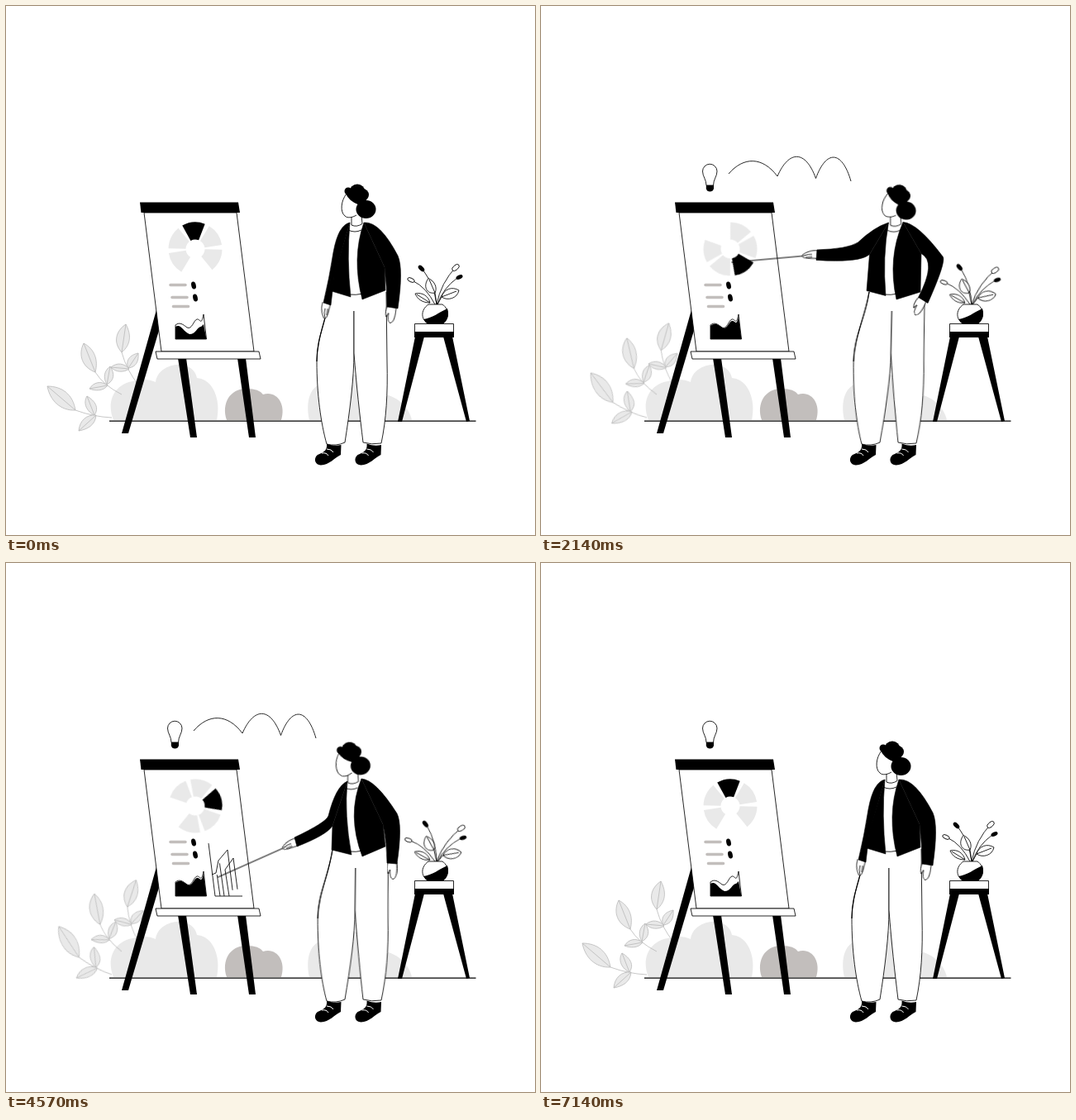
Recreate the animation shown at these times as an HTML page without scripts. Size 640 px wide and 640 px high, loop 7.21 s.

```html
<!DOCTYPE html>
<html lang="en">
<head>
<meta charset="utf-8">
<title>Presentation</title>
<style>
html, body { margin: 0; width: 100%; height: 100%; overflow: hidden; background: #fff; }
svg { display: block; width: 100%; height: 100%; }
svg * { animation: 7210ms ease-in-out infinite; }
.line { fill: none; stroke: #000; stroke-width: .85; }
.out { fill: #fff; stroke: #000; stroke-width: .85; stroke-linejoin: round; }
.pale { fill: #e9e9e9; }
.mid { fill: #c2bebc; }
.trim { stroke-dasharray: 1 2; animation-timing-function: linear; }

/* plants: --a is the swing of each part */
.sway { animation: sway 3605ms cubic-bezier(.37,0,.63,1) infinite alternate; }
@keyframes sway { to { transform: rotate(var(--a)); } }
.leaves path { fill: #e9e9e9; stroke: #b9b9b9; stroke-width: .8; }
.leaves .stem { fill: none; }
.pot .sway { transform-origin: 520px 361px; }

/* board */
#donut { transform-origin: 229px 294px; animation-name: spin; fill: none; stroke-width: 21; }
@keyframes spin {
  0% { transform: rotate(0); animation-timing-function: cubic-bezier(.33,0,.67,0); }
  20.8% { transform: rotate(54deg); animation-timing-function: cubic-bezier(.33,.23,.67,.67); }
  38.7% { transform: rotate(261deg); animation-timing-function: cubic-bezier(.33,.46,.67,.78); }
  53.5% { transform: rotate(385deg); animation-timing-function: cubic-bezier(.33,.33,.67,.46); }
  63.4% { transform: rotate(438deg); animation-timing-function: cubic-bezier(.33,.22,.67,.72); }
  79.2% { transform: rotate(642deg); animation-timing-function: cubic-bezier(.33,.92,.67,1); }
  99%, 100% { transform: rotate(720deg); }
}
#area { animation-name: area; }
@keyframes area {
  0%, 38.7%, 99%, 100% { d: path("M205 388C212 384 214 394 222 397C230 397 232 387 236 388L239 385 242.500 403H205Z"); }
  20.8%, 63.4% { d: path("M205 387C210 383 214 385 219 389C225 393 227 382 231 381C235 380 236 389 239 376L242.500 403H205Z"); }
  53.5%, 79.2% { d: path("M205 388C211 385 214 391 221 394C228 394 230 384 233 385C235 386 237 387 239 381L242.500 403H205Z"); }
}
#bars path { animation-name: bars; }
@keyframes bars {
  0%, 51.3% { stroke-dashoffset: 1.01; }
  64.4%, 85.3% { stroke-dashoffset: 0; }
  95.7%, 100% { stroke-dashoffset: 1.01; }
}

/* idea */
#arc { animation-name: arc; }
@keyframes arc {
  0% { stroke-dashoffset: 1.01; }
  11%, 87.500% { stroke-dashoffset: 0; }
  99%, 100% { stroke-dashoffset: -1.01; }
}
#bulb { animation-name: bulb; }
@keyframes bulb { 0%, 6.500% { opacity: 0; } 10%, 100% { opacity: 1; } }
#rays path { animation-name: rays; }
@keyframes rays {
  0%, 9.7% { stroke-dashoffset: 1.01; }
  26.3% { stroke-dashoffset: -1.01; }
  26.4%, 44.4% { stroke-dashoffset: 1.01; }
  61% { stroke-dashoffset: -1.01; }
  61.1%, 79.3% { stroke-dashoffset: 1.01; }
  95.900%, 100% { stroke-dashoffset: -1.01; }
}

/* presenter */
#legs { transform-origin: 420px 530px; animation-name: legs; }
@keyframes legs {
  0%, 53.5%, 99%, 100% { transform: skewX(0); }
  20.8% { transform: skewX(-1.9deg); }
  38.7% { transform: skewX(-.6deg); }
  63.4% { transform: skewX(-.7deg); }
  79.2% { transform: skewX(.7deg); }
}
#neck, #skull { animation-name: neck; }
@keyframes neck {
  0%, 99%, 100% { transform: translate(0, 0); }
  20.8% { transform: translate(4.7px, -.2px); }
  38.7% { transform: translate(4.7px, .8px); }
  53.5% { transform: translate(-9.4px, 2.7px); }
  63.4% { transform: translate(-4.5px, .8px); }
  79.2% { transform: translate(-15.4px, 3.8px); }
}
#head { transform-origin: 424px 260px; animation-name: head; }
@keyframes head {
  0%, 99%, 100% { transform: rotate(0); }
  20.8%, 38.7% { transform: rotate(6deg); }
  53.5% { transform: rotate(-10deg); }
  63.4% { transform: rotate(-8deg); }
  79.2% { transform: rotate(-23deg); }
}
.jacket { stroke: #000; stroke-width: .6; stroke-linejoin: round; }
#front { animation-name: front; }
@keyframes front {
  0%, 99%, 100% { d: path("M416 262L397 325 394 345 417 352Q412 305 416 262"); }
  20.8% { d: path("M421 262L397 298 394 344 417 350Q413 303 421 262"); }
  38.7% { d: path("M420 262L398 303 394 345 417 351Q413 303 420 262"); }
  53.5% { d: path("M410 266L395 322 393 350 419 355Q407 305 410 266"); }
  63.4% { d: path("M413 264L395 318 394 347 418 353Q409 305 413 264"); }
  79.2% { d: path("M405 266L393 315 392 352 419 355Q403 305 405 266"); }
}
#arm { animation-name: arm; }
@keyframes arm {
  0%, 99%, 100% { d: path("M416 262Q402 265 396 298Q391 330 384 359L393 362Q395 345 397 328"); animation-timing-function: ease-in; }
  10.4% { d: path("M419 262Q402 267 386 294Q378 312 345 332L352 342Q388 324 397 312"); animation-timing-function: ease-out; }
  20.8% { d: path("M421 262Q402 267 380 284Q368 290 331 290L331 302Q383 309 397 298"); }
  38.7% { d: path("M420 262Q404 268 387 288Q374 298 337 300L335 313Q388 313 398 303"); }
  53.5% { d: path("M410 266Q396 273 387 308Q384 316 350 338L354 350Q388 335 395 322"); }
  63.4% { d: path("M413 264Q399 270 390 306Q387 314 349 332L352 343Q388 329 395 318"); }
  79.2% { d: path("M405 266Q388 275 377 306Q374 313 335 333L338 345Q384 331 393 315"); animation-timing-function: ease-in; }
  89% { d: path("M411 264Q395 270 385 303Q381 325 354 348L361 357Q389 338 395 324"); animation-timing-function: ease-out; }
}
#hand { animation-name: hand; }
@keyframes hand {
  0%, 99%, 100% { transform: translate(388px, 360px) rotate(-82deg); animation-timing-function: ease-in; }
  10.4% { transform: translate(348px, 337px) rotate(-38deg); animation-timing-function: ease-out; }
  20.8% { transform: translate(332px, 295px) rotate(.3deg); }
  38.7% { transform: translate(336px, 307px) rotate(-10.6deg); }
  53.5% { transform: translate(352px, 344px) rotate(-32.5deg); }
  63.4% { transform: translate(351px, 338px) rotate(-24deg); }
  79.2% { transform: translate(337px, 339px) rotate(-21.4deg); animation-timing-function: ease-in; }
  89% { transform: translate(357px, 353px) rotate(-45deg); animation-timing-function: ease-out; }
}
#stick { animation-name: stick; stroke-width: 1.2; }
@keyframes stick {
  0%, 8% { stroke-dashoffset: 1.01; }
  16%, 83% { stroke-dashoffset: 0; }
  91%, 100% { stroke-dashoffset: 1.01; }
}
#back { animation-name: back; }
@keyframes back {
  0%, 99%, 100% { d: path("M433 262Q418 305 431 355L459 344 458 316"); }
  20.8% { d: path("M438 261Q419 305 430 355L459 346 460 298"); }
  38.7% { d: path("M438 262Q419 305 430 355L459 346 460 301"); }
  53.5% { d: path("M425 262Q409 305 433 356L459 344 455 314"); }
  63.4% { d: path("M430 261Q412 305 431 355L459 343 456 316"); }
  79.2% { d: path("M419 262Q408 305 434 356L459 341 453 310"); }
}
#arm2 { animation-name: arm2; }
@keyframes arm2 {
  0%, 99%, 100% { d: path("M433 262Q452 260 474 302Q481 318 474 366L461 364Q461 340 458 316L433 262"); }
  20.8% { d: path("M438 261Q456 262 487 302Q492 307 469 358L457 350Q480 308 460 298L438 261"); }
  38.7% { d: path("M438 262Q455 263 485 304Q490 309 467 361L456 355Q478 311 460 301L438 262"); }
  53.5% { d: path("M425 262Q443 263 472 303Q479 316 474 363L462 362Q461 338 455 314L425 262"); }
  63.4% { d: path("M430 261Q447 262 473 303Q480 317 473 364L461 363Q461 339 456 316L430 261"); }
  79.2% { d: path("M419 262Q440 262 470 301Q478 312 481 356L469 358Q465 335 453 310L419 262"); }
}
#hand2 { animation-name: hand2; }
@keyframes hand2 {
  0%, 99%, 100% { transform: translate(467px, 363px) rotate(8deg); }
  20.8% { transform: translate(462px, 353px) rotate(28deg); }
  38.7% { transform: translate(461px, 357px) rotate(25deg); }
  53.5%, 63.4% { transform: translate(467.5px, 362px) rotate(0); }
  79.2% { transform: translate(475px, 356px) rotate(-12deg); }
}
</style>
</head>
<body>
<svg viewBox="0 0 640 640">
  <defs>
    <g id="shoe">
      <path d="M388 529.500Q397 533 405.500 531L405 543C398 546 391 555.500 381 555.500C373 555 372 547 377 543C384 540 389 538 388 529.500Z"/>
      <path d="M382 541Q388 540 390 544M388 536Q394 536 396 540" fill="none" stroke="#fff"/>
    </g>
  </defs>

  <!-- bushes -->
  <path class="pale" d="M130 501C121 479 130 455 160 453Q171 450 181 455C184 430 227 426 231 450C252 452 260 478 255 501Z"/>
  <path class="mid" d="M267 501C260 480 272 462 292 463Q306 463 311 470C328 465 339 482 333 501Z"/>
  <path class="pale" d="M367 501C362 478 368 458 386 456C395 443 440 437 450 470C470 468 488 485 491 501Z"/>

  <!-- branches -->
  <g class="leaves">
    <g class="sway" style="--a:19.5deg;transform-origin:128px 498px">
      <path class="stem" d="M128 498Q106 497 84 489"/>
      <path d="M84 489C66 490 53 477 50 460C68 460 81 470 84 489L50 460"/>
      <path d="M107 495C95 489 94 478 98 472C108 478 113 486 107 495L98 472"/>
      <path d="M109 495C108 507 99 512 88 514C89 502 97 494 109 495L88 514"/>
    </g>
    <g class="sway" style="--a:13.4deg;transform-origin:140px 470px">
      <path class="stem" d="M140 470Q118 459 108 443"/>
      <path d="M108 443C92 437 87 422 94 408C107 415 112 428 108 443L94 408"/>
      <path d="M122 458C117 449 119 441 126 436C132 445 131 453 122 458L126 436"/>
      <path d="M123 459C118 466 108 466 101 463C106 455 115 453 123 459L101 463"/>
    </g>
    <g class="sway" style="--a:11.6deg;transform-origin:160px 458px">
      <path class="stem" d="M160 458Q146 441 140 419"/>
      <path d="M140 419C129 407 133 393 145 385C152 398 151 410 140 419L145 385"/>
      <path d="M148 438C144 429 150 422 160 420C161 430 157 437 148 438L160 420"/>
      <path d="M149 439C142 444 132 443 127 437C134 431 143 432 149 439L127 437"/>
    </g>
  </g>

  <path class="line" d="M125 502.200H568.500" style="stroke-width:1.2"/>

  <!-- easel -->
  <path d="M183 364L187 386 148 517H140ZM208 426H218L231 522H223ZM280 426H290L302 522H294Z"/>
  <path class="out" d="M167 250H279L300 418H188Z"/>
  <path class="out" d="M181 418H306L308 427H183Z"/>
  <path d="M162 237.500H281L283 250H163.500Z"/>

  <g id="donut">
    <circle cx="229" cy="294" r="22" pathLength="360" stroke="#e9e9e9" stroke-dasharray="50 10 50 70 50 10 50 70" transform="rotate(-59 229 294)"/>
    <circle cx="229" cy="294" r="22" pathLength="360" stroke="#000" stroke-dasharray="50 310" transform="rotate(-119 229 294)"/>
  </g>
  <path d="M199 337.500H217M201 352.500H219M202.500 363.500H220.500" fill="none" stroke="#c2bebc" stroke-width="3.600" stroke-linecap="round"/>
  <ellipse cx="227" cy="338" rx="2.800" ry="4.600" transform="rotate(-12 227 338)"/>
  <ellipse cx="229" cy="353" rx="2.800" ry="4.600" transform="rotate(-12 229 353)"/>
  <path class="out" d="M205 386C210 382 214 385 219 389C225 392 227 380 231 379C235 378 236 388 239 373L242.500 403H205Z"/>
  <path id="area" d="M205 388C212 384 214 394 222 397C230 397 232 387 236 388L239 385 242.500 403H205Z"/>
  <g id="bars" class="line">
    <path class="trim" pathLength="1" d="M286 403H253L244 331"/>
    <path class="trim" pathLength="1" d="M249 377L254 375 257 360 268 347 275 403"/>
    <path class="trim" pathLength="1" d="M264 403L258 360"/>
    <path class="trim" pathLength="1" d="M270 403L265 371 275 357 281 402"/>
    <path class="trim" pathLength="1" d="M259 403L255 375"/>
  </g>

  <!-- idea -->
  <path id="arc" class="line trim" pathLength="1" d="M375 212C364 174 345 174 332.500 208.500C320 174 300 174 286 206C268 182 245 182 227 203"/>
  <g id="bulb">
    <path class="out" d="M200 217C200 210 195.500 206 195.500 200A8.750 8.750 0 0 1 213 200C213 206 208.500 210 208.500 217Z"/>
    <path d="M199.800 217H209V221Q208 224.500 204.400 224.500T199.800 221Z"/>
  </g>
  <g id="rays" class="line">
    <path class="trim" pathLength="1" d="M199.500 189.500L194 183"/>
    <path class="trim" pathLength="1" d="M211 189.500L216 183"/>
    <path class="trim" pathLength="1" d="M193 197L186 194.500"/>
    <path class="trim" pathLength="1" d="M215 197L222 194.500"/>
    <path class="trim" pathLength="1" d="M195 208L188 212"/>
    <path class="trim" pathLength="1" d="M214 208L221 212"/>
  </g>

  <!-- stool and pot -->
  <path d="M495 400H506L479 503H474ZM529 400H540L561 502 557 503Z"/>
  <path class="out" d="M494.500 384.500H541.500V400H494.500Z"/>
  <path d="M494 394H542V401H494Z"/>
  <g class="pot">
    <g class="sway" style="--a:7.6deg">
      <path class="line" d="M521 361Q518 338 505 320"/>
      <ellipse cx="502.500" cy="317.500" rx="2.600" ry="4.600" transform="rotate(-45 502.500 317.500)"/>
    </g>
    <g class="sway" style="--a:-8deg">
      <path class="line" d="M519 361Q508 340 493 333"/>
      <ellipse class="out" cx="490" cy="331.500" rx="4.500" ry="2.300" transform="rotate(25 490 331.500)"/>
    </g>
    <g class="sway" style="--a:11deg">
      <path class="line" d="M521 361Q526 335 545 315"/>
      <ellipse class="out" cx="544" cy="316.500" rx="5" ry="2.800" transform="rotate(-40 544 316.500)"/>
    </g>
    <g class="sway" style="--a:10deg">
      <path class="line" d="M522 361Q529 341 546 329"/>
      <ellipse cx="548.500" cy="328" rx="4.300" ry="2.400" transform="rotate(-25 548.500 328)"/>
    </g>
    <g class="sway" style="--a:-6deg">
      <path class="out" d="M519 347C509 349 504 339 511 329.500C519 333 522 341 519 347L512 331M519 347L521 361"/>
    </g>
    <g class="sway" style="--a:14deg">
      <path class="out" d="M527 352C530 342 540 339 548 344C546 354 534 357 527 352L545 345M527 352L522 361"/>
    </g>
    <g class="sway" style="--a:-4deg">
      <path class="out" d="M513 359C504 359 498 355 495 348C504 346 511 351 513 359L497 349"/>
    </g>
    <path class="out" d="M511 361H528C537 367 536 380 528 384H511C502 380 501 368 511 361Z"/>
    <path d="M505 379C515 378 525 370 534 366C537 375 533 382 528 385H511Q507 383 505 379Z"/>
  </g>

  <!-- presenter -->
  <use href="#shoe"/>
  <use href="#shoe" x="48.500"/>
  <g id="legs" class="out">
    <path d="M393 346C388 380 376 400 376 430C376 470 381 505 388 530Q399 533 410 528C416 490 421 450 421 420V369"/>
    <path d="M421 369V420C424 460 428 495 432 528Q442 531 454 529C460 500 462 470 461 430L460 346"/>
    <path class="line" d="M393 346C388 380 376 400 376 430" style="stroke-width:1.200"/>
  </g>
  <path class="line" d="M415 349Q423 350 432 348"/>
  <g id="neck" class="out">
    <path d="M418 252V265Q424 268 431 263.500L430 252"/>
    <path class="line" d="M414 271Q422 275 430 271"/>
  </g>
  <g id="hand2">
    <path class="out" d="M-5.500 0C-7 6-7 10-5 14L-3 9C-3 14-3 20 1 20.500C5 19 6 11 5 0"/>
  </g>
  <g id="hand">
    <path id="stick" class="line trim" pathLength="1" d="M0 0H-104"/>
    <path class="out" d="M1-5C-6-6-12-5-18-1C-19 2-14 3-10 3.500L1 4.500"/>
    <path class="line" d="M-17 0Q-10-2-6-1M-14 2H-6"/>
  </g>
  <g class="jacket">
    <path id="front" d="M416 262L397 325 394 345 417 352Q412 305 416 262"/>
    <path id="arm" d="M416 262Q402 265 396 298Q391 330 384 359L393 362Q395 345 397 328"/>
    <path id="back" d="M433 262Q418 305 431 355L459 344 458 316"/>
    <path id="arm2" d="M433 262Q452 260 474 302Q481 318 474 366L461 364Q461 340 458 316L433 262"/>
  </g>
  <g id="skull">
    <g id="head">
      <path class="out" d="M412 227C405 236 404 249 410 254C413 257 419 256 424 253"/>
      <path d="M413 228L424 252 429 246V230Z" fill="#fff"/>
      <circle cx="414" cy="224" r="4.500"/>
      <circle cx="425" cy="225" r="9.500"/>
      <circle cx="431.500" cy="228.500" r="7.500"/>
      <circle cx="428" cy="232" r="8"/>
      <path d="M411 227Q415 236 426 240L430 225Z"/>
      <ellipse cx="435.500" cy="246" rx="12" ry="11"/>
    </g>
  </g>
</svg>
</body>
</html>
```
